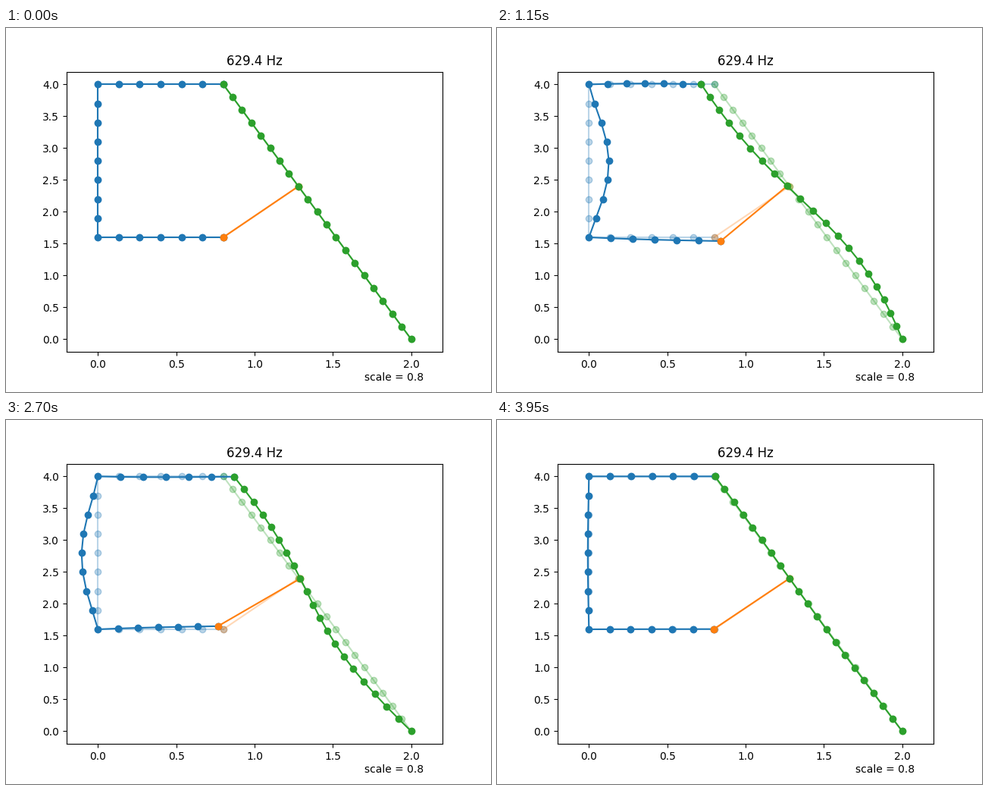
These frames come from a looping animation (640 px wide and 480 px high, 4 s). A matplotlib script:

```python
import numpy as np
import matplotlib.pyplot as plt
from matplotlib.animation import FuncAnimation

FRAMES, INTERVAL = 80, 50
# Mode amplitudes below are in screen pixels at 70 % deflection.
UNIT = 0.7 * np.array([496 / 2.4, 84.0])


def beam(start, end, parts):
    return np.linspace(start, end, parts + 1)


def cubic(u, slope, tip):
    """Deflection with a given root slope and a moment-free tip."""
    c = (slope - tip) / 2
    return slope * u - 3 * c * u**2 + c * u**3


def shape(dx, dy):
    return np.column_stack([dx, dy]) / UNIT


# Rest geometry
top = beam((0.8, 4), (0, 4), 6)
wall = beam((0, 4), (0, 1.6), 8)
floor = beam((0, 1.6), (0.8, 1.6), 6)
leg = beam((0.8, 4), (2, 0), 20)

# Mode shape of each beam
u = np.linspace(1, 0, 7)
top_mode = shape(-14.25 * u, cubic(u, 4.7, 0.31))

u = np.linspace(0, 1, 9)
bulge = u * (1 - u) * (86.5 + 18 * (u - 0.5) - 172 * (u - 0.5) ** 2)
wall_mode = shape(bulge, 0 * u)

u = np.linspace(0, 1, 7)
floor_mode = shape(7 * u, -cubic(u, 7.1, 4.1))

u = np.linspace(0, 1, 21)
knots = [0, 0.1, 0.2, 0.4, 0.6, 0.8, 0.9, 1]
sway = np.polyval(np.polyfit(knots, [-14.25, -15.1, -13.6, -2.5, 11.6, 13, 7.75, 0], 7), u)
stretch = np.interp(u, [0, 0.4, 1], [2.05, 0.6, 0])
leg_mode = shape(sway, 0.122 * sway + stretch)

frame = np.vstack([top, wall[1:], floor[1:]])
frame_mode = np.vstack([top_mode, wall_mode[1:], floor_mode[1:]])
link = np.array([floor[-1], leg[8]])
link_mode = np.array([floor_mode[-1], leg_mode[8]])

parts = [(frame, frame_mode, "C0"), (link, link_mode, "C1"), (leg, leg_mode, "C2")]

fig, ax = plt.subplots(figsize=(6.4, 4.8), dpi=100)
ax.set_xlim(-0.2, 2.2)
ax.set_ylim(-0.2, 4.2)
ax.set_title("629.4 Hz")
fig.text(0.8, 15 / 480, "scale = 0.8", ha="center")

for rest, _, color in parts:
    ax.plot(*rest.T, "o-", color=color, alpha=0.3)
lines = [ax.plot(*rest.T, "o-", color=color)[0] for rest, _, color in parts]


def triangle(i):
    """Triangle wave: 0, 1, 0, -1, 0 over one loop."""
    phase = (i / FRAMES + 0.25) % 1
    return 1 - 4 * abs(phase - 0.5)


def update(i):
    amp = triangle(i)
    for line, (rest, mode, _) in zip(lines, parts):
        line.set_data(*(rest + amp * mode).T)
    return lines


anim = FuncAnimation(fig, update, frames=FRAMES, interval=INTERVAL, repeat=True, repeat_delay=0)
plt.show()
```
